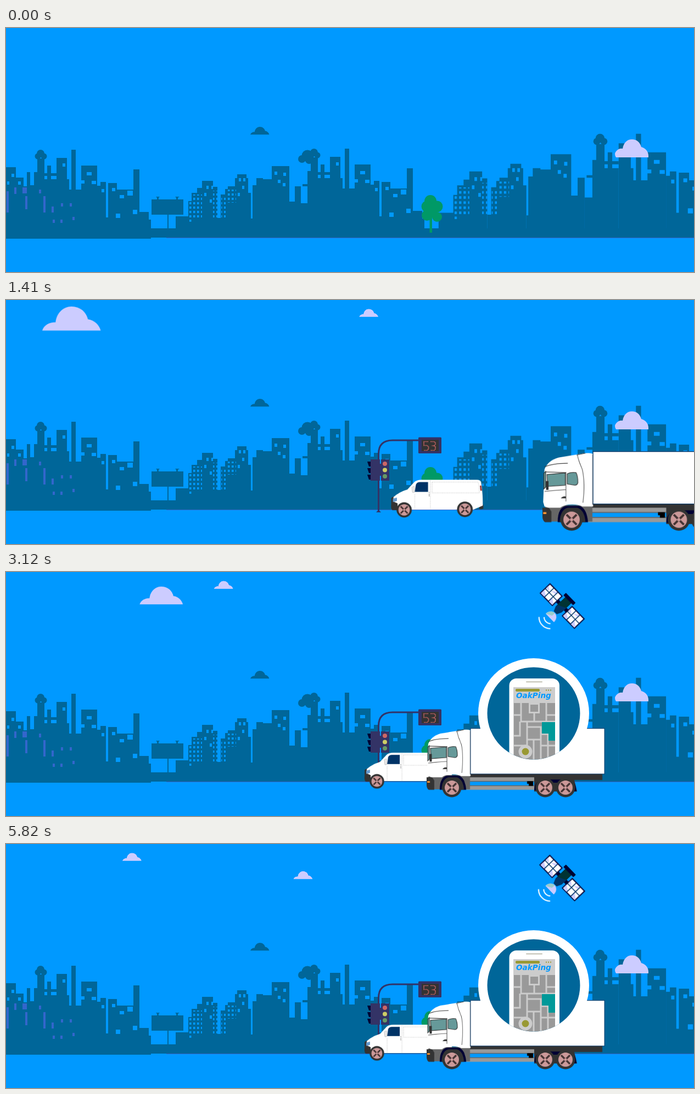
Write an HTML page that moves like this. It is 1253 px wide and 447 px high and loops after 8 s.

```html
<!DOCTYPE html>
<html lang="en">
<head>
<meta charset="utf-8">
<title>City traffic</title>
<style>
html, body { margin: 0; width: 100%; height: 100%; overflow: hidden; background: #09f; }
svg { display: block; width: 1253px; height: 447px; }
.line { fill: none; }
.win { fill: none; stroke: #09f; stroke-width: 6; }
.lilac { fill: none; stroke: #36c; stroke-width: 4; }
.anim { animation: 8s linear infinite; }
#light { animation-name: light; }
#van { animation-name: van; transform-origin: 652px 331px; }
#truck { animation-name: truck; transform-origin: 767px 286px; }
#bigCloud { animation-name: bigCloud; }
#smallCloud { animation-name: smallCloud; }
#sat { animation-name: sat; }
#pulse { animation-name: pulse; }
#ring { animation-name: ring; transform-origin: 961px 259px; }
#phone { animation-name: phone; }

@keyframes light {
  0%, 1.12% { opacity: 0 }
  1.125%, 100% { opacity: 1 }
}
@keyframes van {
  0%, 1.49% { opacity: 0; transform: translate(265px, -8.5px) scale(1.265) }
  1.5% { opacity: 1; transform: translate(265px, -8.5px) scale(1.265) }
  21.25%, 100% { opacity: 1; transform: translate(0, 0) scale(1) }
}
@keyframes truck {
  0%, 11.24% { opacity: 0; transform: translate(383px, -16px) scale(1.27) }
  11.25% { opacity: 1; transform: translate(383px, -16px) scale(1.27) }
  25.5%, 100% { opacity: 1; transform: translate(0, 0) scale(1) }
}
@keyframes bigCloud {
  0%, 7.49% { opacity: 0; transform: translate(-18.3px, 4.9px) scale(1.051) }
  7.5% { opacity: 1; transform: translate(-18.3px, 4.9px) scale(1.051) }
  72.75%, 100% { opacity: 1; transform: translate(523.5px, 50px) scale(.305) }
}
@keyframes smallCloud {
  0%, 7.49% { opacity: 0; transform: translate(768.6px, 16.5px) scale(.305) }
  7.5% { opacity: 1; transform: translate(768.6px, 16.5px) scale(.305) }
  52.5%, 100% { opacity: 1; transform: translate(212px, 16.5px) scale(.305) }
}
@keyframes sat {
  0%, 18.74% { opacity: 0; transform: translate(980px, 95px) scale(.8) }
  18.75% { opacity: 1; transform: translate(980px, 95px) scale(.8) }
  23.625%, 100% { opacity: 1; transform: translate(1013px, 62.3px) scale(1) }
}
@keyframes pulse {
  0%, 33%, 40.125%, 47.25%, 54.375%, 61.5%, 68.625%, 100% { transform: scale(1) }
  36.5625%, 43.6875%, 50.8125%, 57.9375%, 65.0625% { transform: scale(.94) }
}
@keyframes ring {
  0%, 25.875% { transform: scale(0) }
  31.875%, 100% { transform: scale(1) }
}
@keyframes phone {
  0%, 31.125% { transform: translateY(151px) }
  36.375%, 100% { transform: translateY(0) }
}
</style>
</head>
<body>
<svg viewBox="0 0 1253 447">
<defs>
  <path id="cloud" d="M0 47 C4 36 14 31 26 31 C28 12 42 0 57 0 C74 0 86 11 89 25 C102 27 111 36 114 47 Z"/>

  <pattern id="panes" width="7" height="8" x="334" y="319" patternUnits="userSpaceOnUse">
    <rect width="3.5" height="4" fill="#09f"/>
  </pattern>

  <g id="city">
    <g fill="#069">
      <path d="M309 384 V345 H332 V317 H338 V302 H348 V293 H357 V280 H377 V291 H385 V384 Z"/>
      <path d="M385 384 V348 H391 V305 H399 V295 H404 V290 H417 V275 H421 V268 H438 V275 H441 V302 H446 V384 Z"/>
      <path d="M446 384 V349 H449 V288 H456 V275 H468 V277 H484 V253 H516 V318 H526 V290 H537 V384 Z"/>
      <path d="M537 384 V321 H549 V262 H555 V237 H568 V264 H573 V250 H580 V264 H590 V384 Z"/>
      <path d="M590 384 V236 H609 V275 H613 V294 H617 V221 H625 V294 H635 V250 H664 V384 Z"/>
      <path d="M664 384 V287 H670 V280 H680 V345 H684 V282 H700 V294 H730 V257 H741 V335 H758 V349 H762 V384 Z"/>
      <rect x="540" y="286" width="10" height="4"/>
      <circle cx="556" cy="233" r="5.5"/>
      <circle cx="561" cy="228" r="7"/>
      <circle cx="567" cy="233" r="5.5"/>
    </g>
    <g fill="url(#panes)">
      <rect x="333" y="319" width="8" height="36"/>
      <rect x="341" y="305" width="16" height="45"/>
      <rect x="377" y="298" width="8" height="50"/>
      <rect x="392" y="308" width="8" height="40"/>
      <rect x="402" y="296" width="17" height="24"/>
    </g>
    <path class="win" d="M365 292 h4 M374 292 h3 M361 305 h4 M371 317 h4"/>
    <path class="win" d="M424 278 h4 M432 278 h4 M430 292 h4 M422 305 h4"/>
    <path class="win" d="M489 266 h5 M505 268 h5 M495 281 h5 M504 287 h5"/>
    <path class="win" d="M568 272 h5 M580 272 h10 M601 249 h5"/>
    <path class="win" d="M645 265 h9 M633 280 h8 M654 281 h8 M672 296 h5"/>
    <path class="win" stroke-dasharray="8" d="M691 294 h6 M705 307 h8"/>
    <g fill="#09f">
      <rect x="719" y="296" width="10" height="9"/>
      <rect x="698" y="338" width="8" height="8"/>
      <rect x="729" y="331" width="8" height="8"/>
    </g>
  </g>

  <g id="wheel">
    <circle r="17.5" fill="#333"/>
    <circle r="13" fill="#c99"/>
    <path d="M-8 -8 L8 8 M-8 8 L8 -8" stroke="#433" stroke-width="3.4"/>
    <circle r="2.5" fill="#c99"/>
  </g>

  <g id="panel">
    <rect x="-16" y="-12.5" width="32" height="25" fill="#fff" stroke="#003" stroke-width="2"/>
    <path d="M-15 3 L-5 9 V12 H-15 Z M-5 -5 L5 -12 V-6 Z M5 2 L15 9 V12 H5 Z M-15 -8 L-7 -2 H-15 Z" fill="#ccf"/>
    <path d="M-5.3 -12 V12 M5.3 -12 V12 M-16 0 H16" stroke="#036" stroke-width="1.6"/>
  </g>

  <clipPath id="disc"><circle cx="961" cy="259" r="84.5"/></clipPath>
</defs>

<rect width="1253" height="447" fill="#09f"/>
<path d="M0 384.5 H173 M292 384.5 H1253" stroke="#36c"/>
<use href="#city" transform="translate(427.2 -64.1) scale(1.167)"/>
<use href="#city"/>
<use href="#city" transform="translate(-498 2)"/>

<g fill="#069">
  <rect y="367" width="1253" height="17"/>
  <path d="M0 384 V255 H18 V274 H32 V290 H38 V264 H44 V290 H52 V384 Z"/>
  <circle cx="549" cy="234" r="10.5"/>
  <circle cx="539" cy="240" r="7"/>
  <circle cx="552" cy="242" r="7"/>
  <rect x="265" y="314" width="58" height="28"/>
  <rect x="294" y="342" width="2" height="26"/>
  <path d="M273 309 h7 l-2 2 v3 h-3 v-3 Z M308 309 h8 l-3 2 v3 h-3 v-3 Z"/>
  <use href="#cloud" transform="translate(445 181) scale(.302)"/>
</g>
<path class="win" d="M10 270 h5 M2 284 h4 M22 284 h5"/>
<path class="lilac" d="M3 299 v39 M37 308 v24 M70 308 v30 M85 327 v11"/>
<path class="lilac" d="M17 292 v12 M32 292 v11 M36 292 v11 M62 296 v7"/>
<path class="lilac" d="M102 321 v6 M118 321 v6 M87 351 v6 M101 351 v6 M123 346 v6"/>

<path fill="#ccf" d="M1111 237 Q1107 231 1111 226 Q1116 220 1123 221 C1125 210 1131 204 1140 204 C1149 204 1155 210 1157 218 C1165 220 1171 227 1170 237 Z"/>

<g fill="#096">
  <circle cx="773" cy="317" r="11"/>
  <circle cx="767" cy="327" r="10.5"/>
  <circle cx="785" cy="327" r="10.5"/>
  <circle cx="767" cy="343" r="10"/>
  <circle cx="785" cy="346" r="9"/>
  <rect x="766" y="325" width="20" height="22"/>
  <rect x="771.5" y="345" width="4.5" height="30"/>
</g>

<g fill="#ccf">
  <use id="bigCloud" class="anim" href="#cloud"/>
  <use id="smallCloud" class="anim" href="#cloud"/>
</g>

<g id="light" class="anim">
  <path class="line" d="M678.5 387 V282 Q678.5 257 704 257 H752" stroke="#336" stroke-width="3"/>
  <path d="M674 389 l3 -3 h3 l3 3 Z" fill="#336"/>
  <path d="M658 296 h8 v9 h-5 Z M658 308 h8 v9 h-5 Z M658 320 h8 v9 h-5 Z" fill="#003"/>
  <path d="M664 292 h17 v39 h-17 Z M683 292 h15 v39 h-15 Z M680 300 h4 v22 h-4 Z" fill="#336"/>
  <circle cx="690" cy="300" r="4" fill="#c66"/>
  <circle cx="690" cy="311.5" r="4" fill="#cc6"/>
  <circle cx="690" cy="323" r="4" fill="#696"/>
  <rect x="751" y="251.5" width="42" height="29.5" rx="1.5" fill="#336"/>
  <rect x="757" y="256" width="31" height="21" fill="#333"/>
  <g class="line" stroke="#c66" stroke-width="1.7" stroke-dasharray="1.7 .7">
    <path d="M769 259.5 h-8 v7 h6 l2.5 2.5 v4 l-2.5 2.5 h-6"/>
    <path d="M773 259.5 h7 l2 2 v3 l-2.5 2.5 h-4 M779.5 267 l2.5 2 v4 l-2 2.5 h-7"/>
  </g>
</g>

<g id="van" class="anim">
  <path d="M653 374 V363 Q655 360 660 360 H666 V384 H655 Q652 381 653 374 Z" fill="#333"/>
  <path d="M806 374 H813 V381 Q811 383 806 382 Z" fill="#333"/>
  <path d="M657 361 Q667 352 681 348 L693 335 Q697 331 706 331 H802 Q808 331 809 335 Q812 349 812 376 L796 383 H664 V372 L657 369 Z" fill="#fff"/>
  <path d="M694 352 L696 339 Q698 335 703 335 H717 V352 Z" fill="#036"/>
  <path d="M689 344 l4 -2 v11 h-3 Z" fill="#eee" stroke="#999" stroke-width=".5"/>
  <path class="line" d="M721 332 V383 M694 356 V383 M724 335 H804 Q806 344 806 354 H724 Z" stroke="#ccc" stroke-width=".8" stroke-dasharray="2 1"/>
  <path d="M719 355 v5 M720 353 h-2" stroke="#999"/>
  <path d="M807 341 h2.5 l1.3 9 h-3 Z" fill="#933"/>
  <path d="M656 364 l7 -2 v6 l-7 2 Z" fill="#69c"/>
  <use href="#wheel" transform="translate(675.5 383.5) scale(.76)"/>
  <use href="#wheel" transform="translate(781 382.5) scale(.78)"/>
</g>

<g id="truck" class="anim">
  <path d="M840 370 H1086 V381 H1035 L1040 402 H962 V383 H840 Z" fill="#333"/>
  <rect x="840" y="383" width="122" height="9" fill="#09f"/>
  <path d="M843 376 H962 V383 H843 Z M838 392 H962 V399 H838 Z" fill="#999"/>
  <path d="M842 383.5 H962 M838 391.5 H962" stroke="#666" stroke-width="1.5"/>
  <path d="M949 383 h11 v9 h-8 v-4 h-3 Z" fill="#000"/>
  <path class="line" d="M965 400 Q966 383 982 383 H1020 Q1035 384 1036 402" stroke="#003" stroke-width="6"/>
  <path d="M770 372 H845 V398 H774 Z" fill="#666"/>
  <path d="M766 376 H776 L780 382 V399 H770 Q766 397 766 390 Z" fill="#333"/>
  <rect x="767" y="383" width="5" height="3" fill="#f93"/>
  <path d="M790 399 Q790 374 805 373 H824 Q836 376 838 399 Z" fill="#003"/>
  <path d="M793 399 Q794 379 806 376 H821 Q833 380 834 399 Z" fill="#333"/>
  <path d="M769 374 L767 367 L769 315 Q774 301 791 296 L833 289 Q845 288 846 291 V374 H829 Q823 370 807 371 Q799 372 794 376 H775 Z" fill="#fff"/>
  <g class="line" stroke="#333" stroke-width=".8">
    <path d="M769 311 Q782 305 806 305 M769 350 Q788 348 803 347 M803 319 V366"/>
    <path d="M821 291 Q823 301 829 315 Q834 337 830 368 M820 292 L834 289 M845.5 291 V371"/>
  </g>
  <g fill="#699" stroke="#333">
    <path d="M768 321 l3 -3 v25 l-3 3 Z"/>
    <path d="M773 323 L802 320.5 V340 L774 342 Z"/>
    <path d="M805 322 Q810 319 819 320 Q822 325 822 336 Q821 340 817 340 L805 338 Z"/>
  </g>
  <path d="M771 319 L803 320 M772 334 h3 v13 h-3 Z" fill="#333" stroke="#333"/>
  <path d="M795 361 q3 -4 8 -3 v3 Z" fill="#333"/>
  <rect x="846" y="286.5" width="244" height="83.5" fill="#fff" stroke="#036"/>
  <use href="#wheel" x="812" y="395"/>
  <use href="#wheel" x="982" y="395"/>
  <use href="#wheel" x="1019" y="395"/>
</g>

<g id="ring" class="anim">
  <circle cx="961" cy="259" r="101" fill="#fff"/>
  <circle cx="961" cy="259" r="84.5" fill="#069"/>
</g>
<g clip-path="url(#disc)">
  <g id="phone" class="anim">
    <rect x="916.5" y="195" width="91.5" height="180" rx="13" fill="#fff"/>
    <rect x="947" y="200" width="30" height="2.5" rx="1.2" fill="#cccbc0"/>
    <rect x="924" y="211" width="76" height="149" fill="#ccc"/>
    <rect x="928" y="214" width="44" height="5" rx="2" fill="#993"/>
    <path d="M983 216.5 h2 m2 0 h2 m2 0 h2" stroke="#993" stroke-width="2"/>
    <text x="929" y="231" font-family="'DejaVu Sans', sans-serif" font-size="13.6" font-weight="bold" font-style="oblique" fill="#09f">OakPing</text>
    <rect x="925" y="240" width="75" height="120" fill="#999"/>
    <g class="line" stroke="#ccc" stroke-width="3">
      <path d="M925 262 H938 V274 H1000 M938 262 V240 M949 274 V318 H925 M949 284 H974 V360"/>
      <path d="M962 258 V274 M984 240 V274 M984 262 H1000 M974 297 H987 V360 M974 318 H1000"/>
      <path d="M949 307 H974 M961 307 V360 M936 274 V300 H925"/>
      <rect x="953.5" y="241.5" width="17" height="16"/>
    </g>
    <path d="M976 275 H1000 V309 H988 V296 H976 Z" fill="#099"/>
    <circle cx="946" cy="329" r="12.5" fill="#ccc"/>
    <circle cx="946" cy="329" r="6.5" fill="#993"/>
  </g>
</g>

<g id="sat" class="anim">
  <g id="pulse" class="anim">
    <g transform="rotate(46)">
      <path d="M-14 0 H14" stroke="#003" stroke-width="7"/>
      <use href="#panel" x="-29.5"/>
      <use href="#panel" x="29.5"/>
      <path d="M-8 -17 H8 V9 L4 18 H-4 L-8 9 Z" fill="#036"/>
      <path d="M-8 -17 H8 V-3 L-8 5 Z" fill="#033"/>
      <rect x="-13" y="-22" width="26" height="6.5" rx="1" fill="#003"/>
      <path d="M-11 32 A11 13 0 0 1 11 32 Z" fill="#ccf"/>
      <path d="M-11 32 A11 13 0 0 1 0 19 V26 Z" fill="#9cc"/>
      <g class="line" stroke="#fff" stroke-width="2">
        <path d="M-8.5 38.5 A12 12 0 0 0 8.5 38.5"/>
        <path d="M-15.2 45.2 A21.5 21.5 0 0 0 15.2 45.2"/>
      </g>
    </g>
  </g>
</g>
</svg>
</body>
</html>
```
